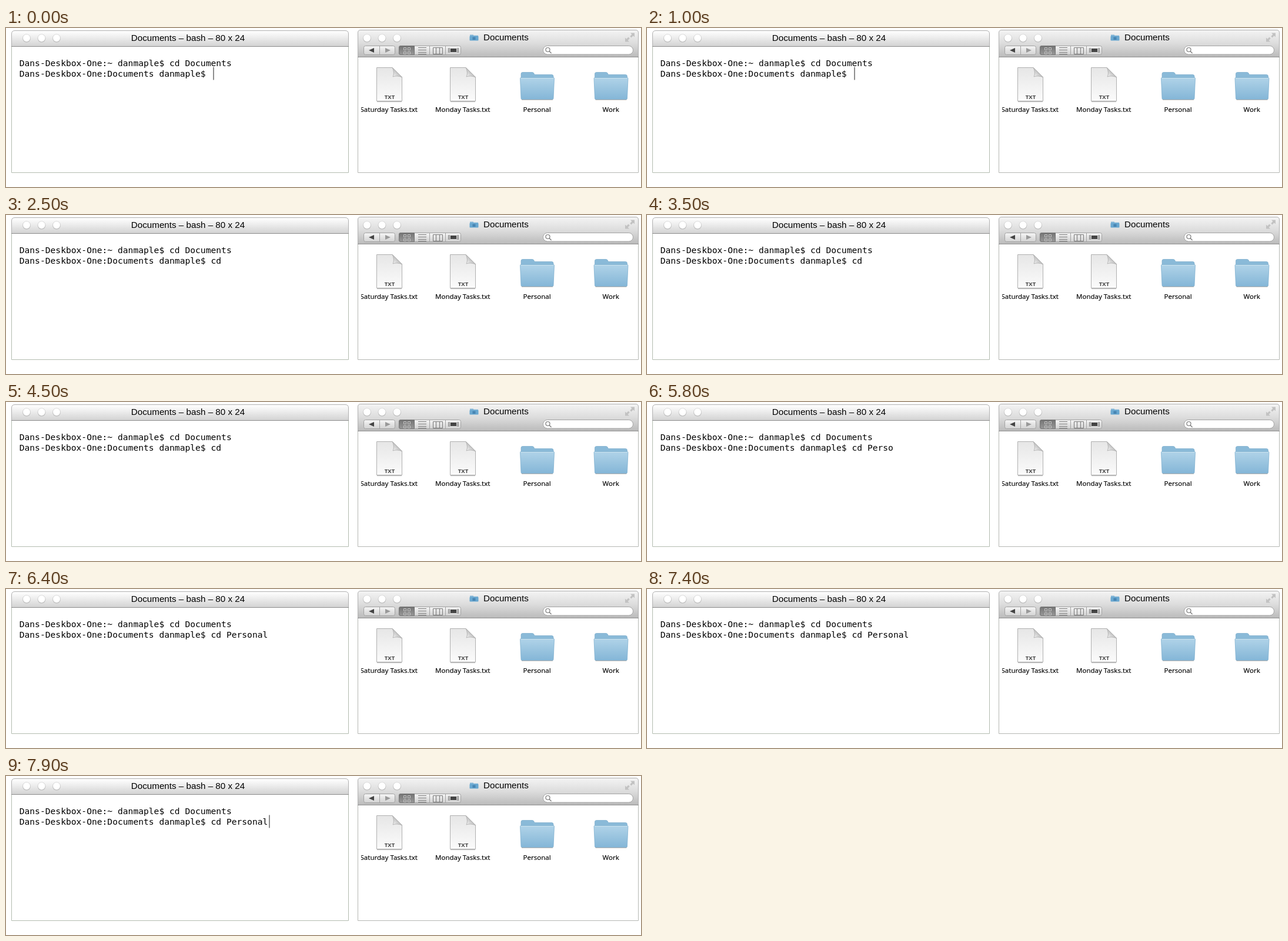
Write an HTML page that moves like this. It is 1080 px wide and 271 px high and loops after 8000 ms.

```html
<!DOCTYPE html>
<html lang="en">
<head>
<meta charset="utf-8">
<title>Terminal and folder window</title>
<style>
  html, body { margin: 0; width: 100%; height: 100%; overflow: hidden; background: #fff; }
  svg { display: block; width: 1080px; height: 271px; }
  .title { font: 15.2px "Liberation Sans", Arial, sans-serif; fill: #000; }
  .term { font: 14.63px "DejaVu Sans Mono", monospace; fill: #000; }
  .label { font: 11.5px "Noto Sans", sans-serif; fill: #000; stroke: #000; stroke-width: .12; }
  .kind { font: bold 9.5px "Open Sans", sans-serif; fill: #444; text-anchor: middle; }
</style>
</head>
<body>
<svg viewBox="0 0 1080 271">
  <defs>
    <linearGradient id="bar" x2="0" y2="1">
      <stop stop-color="#fff"/><stop offset=".3" stop-color="#f3f3f3"/><stop offset="1" stop-color="#d2d2d2"/>
    </linearGradient>
    <linearGradient id="tools" x2="0" y2="1">
      <stop stop-color="#f4f4f4"/><stop offset=".5" stop-color="#dcdcdc"/><stop offset="1" stop-color="#bababa"/>
    </linearGradient>
    <linearGradient id="key" x2="0" y2="1">
      <stop stop-color="#f6f6f6"/><stop offset="1" stop-color="#d2d2d2"/>
    </linearGradient>
    <linearGradient id="pressed" x2="0" y2="1">
      <stop stop-color="#747474"/><stop offset="1" stop-color="#989898"/>
    </linearGradient>
    <linearGradient id="paper" x2="0" y2="1">
      <stop stop-color="#e6e6e6"/><stop offset="1" stop-color="#fbfbfb"/>
    </linearGradient>
    <linearGradient id="fold" x1="0" y1="1" x2="1" y2="0">
      <stop stop-color="#fff"/><stop offset=".5" stop-color="#c4c4c4"/>
    </linearGradient>
    <linearGradient id="front" x2="0" y2="1">
      <stop stop-color="#b0d3e8"/><stop offset="1" stop-color="#84b6d7"/>
    </linearGradient>

    <g id="light">
      <circle cy=".6" r="6.8" fill="#b4b4b4"/>
      <circle r="6.4" fill="#fff" stroke="#ccc" stroke-width=".6"/>
    </g>
    <g id="lights">
      <use href="#light"/><use href="#light" x="25.5"/><use href="#light" x="51"/>
    </g>
    <g id="page">
      <path d="M1 58.5H43" stroke="#bbb" stroke-width="1.5"/>
      <path d="M.5 .5H27L43.5 17V57.5H.5Z" fill="url(#paper)" stroke="#b0b0b0"/>
      <path d="M27 .5C30 6 30 12 28 16C34 14 39 15 43.5 17Z" fill="url(#fold)" stroke="#a8a8a8" stroke-width=".8"/>
      <text class="kind" x="22.5" y="54">TXT</text>
    </g>
    <g id="folder">
      <path d="M3 48.3H56" stroke="#b5b5b5" stroke-width="1.5"/>
      <path d="M2 14V4Q2 1.5 5 1.5H21Q23 1.5 24 3.5L25 5.5H54Q57 5.5 57 8.5V14Z" fill="#8abad8" stroke="#79abca" stroke-width=".7"/>
      <path d="M.5 12Q.5 10.5 2 10.5H57Q58.5 10.5 58.5 12L57 46Q57 47.5 55.5 47.5H3.5Q2 47.5 2 46Z" fill="url(#front)" stroke="#78abcc" stroke-width=".7"/>
      <path d="M1.5 11.5H57.5" stroke="#cbe3f0"/>
    </g>
  </defs>

  <!-- Terminal window -->
  <path d="M9.5 31V246.5H582.5V31" fill="#fff" stroke="#b3bcb0"/>
  <path d="M9.5 31.5V10Q9.5 4.5 15 4.5H577Q582.5 4.5 582.5 10V31.5Z" fill="url(#bar)" stroke="#b0b0b0"/>
  <path d="M9 31.5H583" stroke="#8e8e8e"/>
  <use href="#lights" x="35" y="17"/>
  <text class="title" x="212.8" y="22">Documents – bash – 80 x 24</text>
  <g class="term">
    <text x="22.7" y="65">Dans-Deskbox-One:~ danmaple$ cd Documents</text>
    <text x="22.7" y="83" id="line"></text>
  </g>
  <rect id="cursor" y="66.5" width="1.2" height="22" fill="#444"/>

  <!-- Folder window -->
  <path d="M598.5 50V246.5H1075.5V50" fill="#fff" stroke="#b5b8b3"/>
  <path d="M598.5 49.5V8Q598.5 3.5 603 3.5H1071Q1075.5 3.5 1075.5 8V49.5Z" fill="url(#tools)" stroke="#b0b0b0"/>
  <path d="M598 49.5H1076" stroke="#8e8e8e"/>
  <use href="#lights" x="614" y="17"/>
  <path d="M789 20.5V11.5H794.5L795.5 12.8H803V20.5Z" fill="#7fb3d6"/>
  <rect x="788.5" y="13.8" width="15" height="7.7" rx="1" fill="#68a7d0"/>
  <rect x="793.5" y="15.5" width="5" height="4.5" fill="#4784b2"/>
  <text class="title" x="812" y="21">Documents</text>

  <g fill="#c2c2c2">
    <path d="M1062 8.5H1069V15.5L1066.7 13.2L1063.5 16.4L1061.3 14.2L1064.4 11Z"/>
    <path d="M1060 23.5H1053V16.5L1055.3 18.8L1058.5 15.6L1060.7 17.8L1057.6 21Z"/>
  </g>

  <g stroke="#a2a2a2">
    <rect x="608.5" y="30.5" width="53" height="15" rx="3" fill="url(#key)"/>
    <rect x="668.5" y="30.5" width="105" height="15" rx="3" fill="url(#key)"/>
    <path d="M635.5 31V45M720.5 31V45M747.5 31V45"/>
    <path d="M694.5 30.5H671Q668.5 30.5 668.5 33V43Q668.5 45.5 671 45.5H694.5Z" fill="url(#pressed)" stroke="#747474"/>
  </g>
  <path d="M617 38L626 34V42Z" fill="#444"/>
  <path d="M654 38L645 34V42Z" fill="#999"/>
  <g fill="none" stroke="#777">
    <path d="M676.5 33.5h4v4h-4zM683.5 33.5h4v4h-4zM676.5 40.5h4v4h-4zM683.5 40.5h4v4h-4z" stroke="#c4c4c4"/>
    <path d="M701 33.5H715M701 37.5H715M701 41.5H715M701 44.5H715"/>
    <path d="M726.5 33.5H742.5V44.5H726.5ZM731.5 33V45M737.5 33V45"/>
    <path d="M752.5 34V42M754.5 34V42M767.5 34V42M769.5 34V42"/>
  </g>
  <rect x="756" y="35" width="10" height="6" fill="#444"/>

  <rect x="913.5" y="30.5" width="153" height="14.5" rx="7.2" fill="#fff" stroke="#a2a2a2"/>
  <g fill="none" stroke="#777" stroke-width="1.2">
    <circle cx="921.5" cy="37" r="3.5"/><path d="M924 39.5L927.5 43"/>
  </g>

  <use href="#page" x="630" y="67"/>
  <use href="#page" x="755" y="67"/>
  <use href="#folder" x="874" y="74"/>
  <use href="#folder" x="999.5" y="74"/>
  <g class="label">
    <text x="602.5" y="143">Saturday Tasks.txt</text>
    <text x="730" y="143">Monday Tasks.txt</text>
    <text x="879.5" y="143">Personal</text>
    <text x="1014.5" y="143">Work</text>
  </g>
  <rect x="600" y="132" width="4" height="14" fill="#fff"/>
</svg>
<script>
  const LOOP = 8000;
  const PROMPT = 'Dans-Deskbox-One:Documents danmaple$ ';
  const COMMAND = 'cd Personal';

  // [start ms, letters typed, cursor x (0 = hidden)]
  const steps = [
    [0, 0, 352.4], [500, 0, 0], [1000, 0, 352.4], [1500, 0, 0],
    [2000, 1, 0], [2500, 2, 0],
    [3000, 2, 376.4], [3500, 2, 0], [4000, 2, 376.4], [4500, 2, 0]
  ];
  for (let n = 4; n <= COMMAND.length; n++) steps.push([5000 + (n - 4) * 200, n, 0]);
  steps.push([6900, 11, 447.4], [7400, 11, 0], [7900, 11, 447.4]);

  const line = document.getElementById('line');
  const cursor = document.getElementById('cursor');
  const start = performance.now();

  function draw() {
    const t = (performance.now() - start) % LOOP;
    const [, typed, x] = steps.filter(step => step[0] <= t).pop();
    line.textContent = PROMPT + COMMAND.slice(0, typed);
    cursor.setAttribute('x', x);
    cursor.setAttribute('visibility', x ? 'visible' : 'hidden');
    requestAnimationFrame(draw);
  }
  draw();
</script>
</body>
</html>
```
